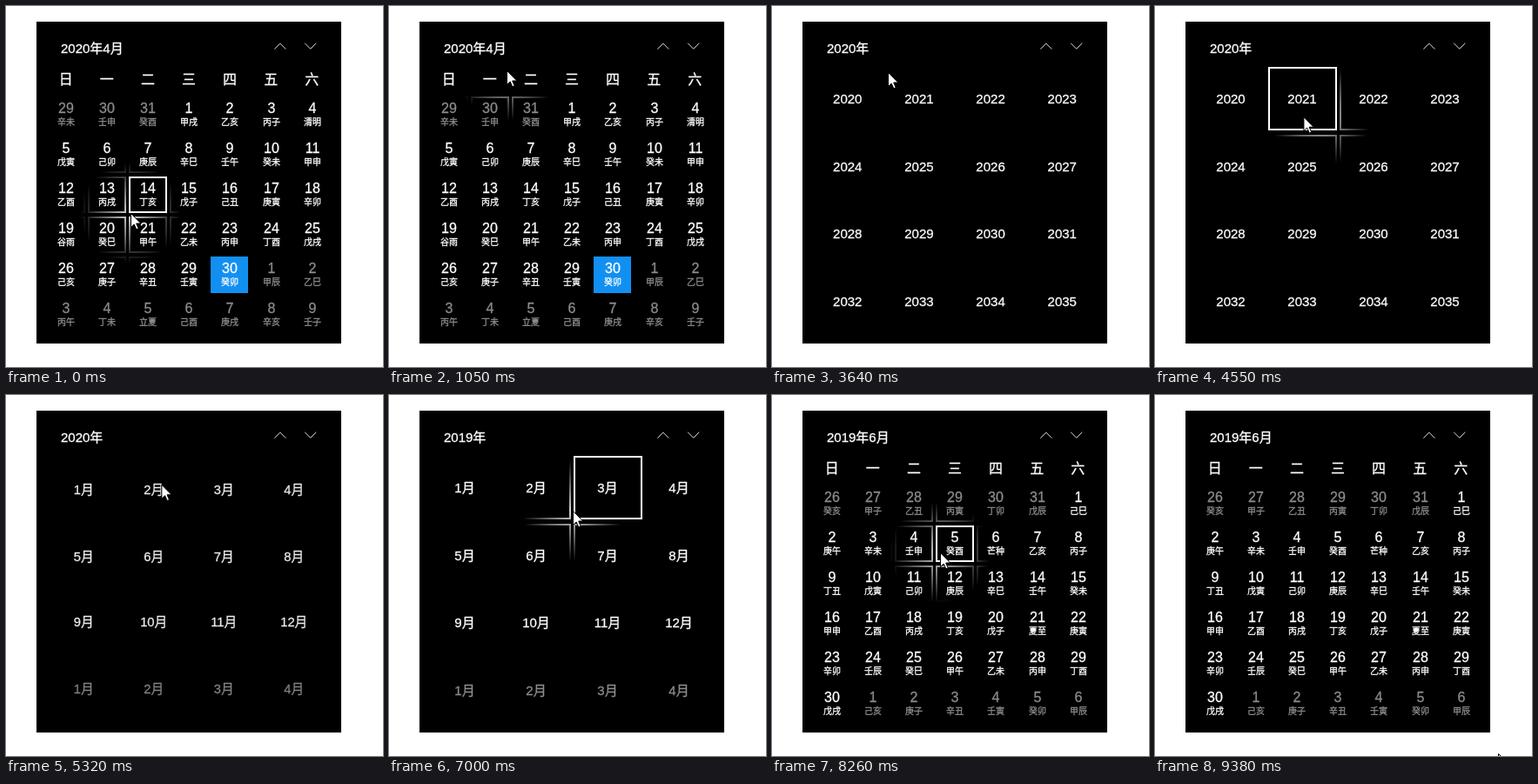
An HTML page with a canvas that plays this animation: 433 px wide and 415 px high, repeating every 9.45 s.

```html
<!DOCTYPE html>
<html lang="zh-CN">
<head>
<meta charset="utf-8">
<title>日历</title>
<style>
html, body { margin: 0; width: 100%; height: 100%; overflow: hidden; background: #fff; }
canvas { display: block; width: 433px; height: 415px; }
</style>
</head>
<body>
<canvas></canvas>
<script>
const LOOP = 9450, STEP = 70, W = 433, H = 415;
const RADIUS = 58, ZOOM_DELAY = 35, ZOOM_TIME = 350;
const FAMILY = '"Liberation Sans", "Noto Sans CJK SC", "Noto Sans CJK", sans-serif';
const WHITE = '#fff', GRAY = '#8c8c8c';
const TERMS = {
  '2020-3-5': '惊蛰', '2020-3-20': '春分', '2020-4-4': '清明', '2020-4-19': '谷雨',
  '2020-5-5': '立夏', '2019-6-6': '芒种', '2019-6-21': '夏至'
};
const DAYS = 0, MONTHS = 1, YEARS = 2;

const VIEWS = [
  { at: 0, level: DAYS, year: 2020, month: 4 },
  { at: 1680, level: DAYS, year: 2020, month: 3 },
  { at: 2590, level: MONTHS, year: 2020 },
  { at: 3290, level: YEARS, year: 2020 },
  { at: 5040, level: MONTHS, year: 2020 },
  { at: 6440, level: MONTHS, year: 2019 },
  { at: 7700, level: DAYS, year: 2019, month: 6 }
];

// pointer moves: start, end, destination; it rests in between
const ORIGIN = [143, 238], UP = [315, 46], TITLE = [100, 47];
const MOVES = [
  [0, 350, [225, 299]],
  [350, 980, [135, 74]],
  [1050, 1260, UP],
  [1820, 2450, TITLE],
  [3500, 3640, [133, 76]],
  [3640, 4200, [251, 122]],
  [4270, 4760, [110, 131]],
  [5110, 5740, UP],
  [6650, 6930, [211, 133]],
  [7000, 7490, [193, 181]],
  [8260, 8400, [199, 196]],
  [8470, 9310, [394, 412]]
];

const canvas = document.querySelector('canvas');
const ratio = window.devicePixelRatio || 1;
canvas.width = W * ratio;
canvas.height = H * ratio;
const ctx = canvas.getContext('2d');

const clamp = v => Math.min(1, Math.max(0, v));

function pointer(t) {
  let [x, y] = ORIGIN;
  for (const [start, end, [tx, ty]] of MOVES) {
    const k = clamp((t - start) / (end - start));
    x += (tx - x) * k;
    y += (ty - y) * k;
  }
  return { x, y };
}

// a thin outline gives small text the weight of hinted glyphs
function text(str, x, y, size, color = WHITE, align = 'center') {
  ctx.font = `${size}px ${FAMILY}`;
  ctx.textAlign = align;
  ctx.fillStyle = ctx.strokeStyle = color;
  ctx.lineWidth = .3;
  ctx.fillText(str, x, y);
  ctx.strokeText(str, x, y);
}

function chevron(x, y, rise) {
  ctx.beginPath();
  ctx.moveTo(x - 6.5, y + rise);
  ctx.lineTo(x, y - rise);
  ctx.lineTo(x + 6.5, y + rise);
  ctx.strokeStyle = '#ddd';
  ctx.lineWidth = 1;
  ctx.stroke();
}

function cells(level) {
  const g = level === DAYS
    ? { cols: 7, rows: 6, x: 47, y: 104, dx: 47.1, dy: 46, w: 44, h: 42 }
    : { cols: 4, rows: 4, x: 47.5, y: 70, dx: 82.3, dy: 77.5, w: 79, h: 73 };
  return Array.from({ length: g.cols * g.rows }, (_, i) => ({
    x: Math.round(g.x + i % g.cols * g.dx),
    y: Math.round(g.y + Math.floor(i / g.cols) * g.dy),
    w: g.w, h: g.h
  }));
}

function dayLabel(date) {
  const key = [date.getUTCFullYear(), date.getUTCMonth() + 1, date.getUTCDate()].join('-');
  const n = date / 864e5 + 17;
  return TERMS[key] || '甲乙丙丁戊己庚辛壬癸'[n % 10] + '子丑寅卯辰巳午未申酉戌亥'[n % 12];
}

function drawDays({ year, month }) {
  [...'日一二三四五六'].forEach((d, i) => text(d, 68.7 + 47.1 * i, 90, 16));
  const lead = new Date(Date.UTC(year, month - 1, 1)).getUTCDay();
  cells(DAYS).forEach((c, i) => {
    const date = new Date(Date.UTC(year, month - 1, 1 - lead + i));
    const inside = date.getUTCMonth() === month - 1;
    const day = date.getUTCDate(), mid = c.x + c.w / 2;
    const color = inside ? WHITE : GRAY;
    if (inside && month === 4 && day === 30) {
      ctx.fillStyle = '#1290f2';
      ctx.fillRect(c.x, c.y, c.w - 1, c.h);
    }
    text(day, mid, c.y + 18.5, 16, color);
    text(dayLabel(date), mid, c.y + 33, 10, color);
  });
}

function drawTiles({ level, year }) {
  cells(level).forEach((c, i) => {
    const label = level === YEARS ? year + i : i % 12 + 1 + '月';
    text(label, c.x + 39, c.y + 42, 15, level === MONTHS && i > 11 ? GRAY : WHITE);
  });
}

function drawView(view, scale, alpha) {
  if (alpha <= 0) return;
  ctx.save();
  ctx.globalAlpha = alpha;
  ctx.translate(210, 224);
  ctx.scale(scale, scale);
  ctx.translate(-210, -224);
  view.level === DAYS ? drawDays(view) : drawTiles(view);
  ctx.restore();
}

function drawGlow(level, { x, y }) {
  if (x > 385 || y > 388) return;
  const light = ctx.createRadialGradient(x, y, 0, x, y, RADIUS);
  light.addColorStop(0, 'rgba(255,255,255,.85)');
  light.addColorStop(1, 'rgba(255,255,255,0)');
  ctx.lineWidth = 2;
  for (const c of cells(level)) {
    const hover = x >= c.x - 1.5 && x <= c.x + c.w && y >= c.y - 1 && y <= c.y + c.h + .5;
    ctx.strokeStyle = hover ? WHITE : light;
    ctx.strokeRect(c.x + 1, c.y + 1, c.w - 2, c.h - 2);
  }
}

function drawCursor({ x, y }) {
  ctx.save();
  ctx.translate(x + .5, y + .5);
  ctx.fillStyle = WHITE;
  ctx.strokeStyle = '#000';
  ctx.lineWidth = 1;
  const arrow = new Path2D('M0 0V16L3.7 12.5 6.3 18.3 8.7 17.3 6.2 11.5H11.3Z');
  ctx.fill(arrow);
  ctx.stroke(arrow);
  ctx.restore();
}

function draw(t) {
  const index = VIEWS.findLastIndex(v => v.at <= t);
  const view = VIEWS[index], last = VIEWS[index - 1];
  const direction = last ? last.level - view.level : 0;

  ctx.setTransform(ratio, 0, 0, ratio, 0, 0);
  ctx.fillStyle = WHITE;
  ctx.fillRect(0, 0, W, H);
  ctx.fillStyle = '#000';
  ctx.fillRect(35, 18, 350, 370);

  text(view.year + '年' + (view.month ? view.month + '月' : ''), 63, 53.5, 15, WHITE, 'left');
  chevron(314.8, 46.3, 3.3);
  chevron(349.7, 46, -3.3);

  ctx.save();
  ctx.beginPath();
  ctx.rect(45, 66, 330, 312);
  ctx.clip();
  const p = direction ? clamp((t - view.at - ZOOM_DELAY) / ZOOM_TIME) : 1;
  const rest = (1 - p) ** 2;
  if (p < 1) drawView(last, 1 + .2 * direction * (1 - rest), 1 - 2 * p);
  drawView(view, 1 - .2 * direction * rest, 1 - rest);
  // after a zoom the light returns with the next pointer move
  const moved = MOVES.some(([start]) => start >= view.at && start <= t);
  if (!direction || (p === 1 && moved)) drawGlow(view.level, pointer(t - STEP));
  ctx.restore();

  drawCursor(pointer(t));
}

const start = performance.now();
function tick() {
  const t = (performance.now() - start) % LOOP;
  draw(Math.floor(t / STEP) * STEP);
  requestAnimationFrame(tick);
}
tick();
</script>
</body>
</html>
```
